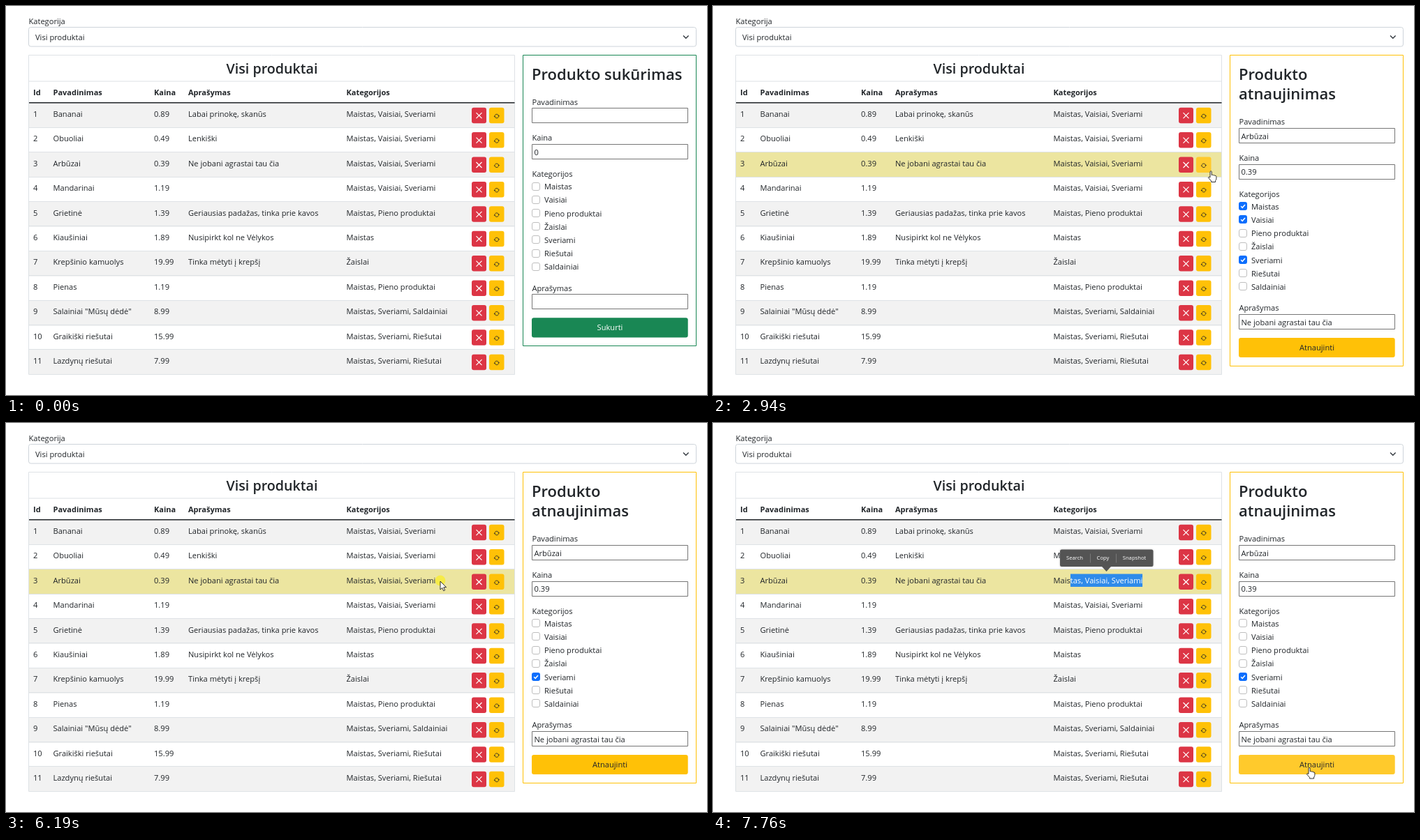
These frames come from a looping animation (1004x558 px, 8 s). An HTML page with a canvas:

```html
<!DOCTYPE html>
<html lang="lt">
<head>
<meta charset="utf-8">
<title>Produktai</title>
<style>
html, body { margin: 0; width: 100%; height: 100%; overflow: hidden; background: #fff; }
canvas { display: block; }
</style>
</head>
<body>
<canvas id="stage" width="1004" height="558"></canvas>
<script>
const ctx = document.getElementById('stage').getContext('2d');
const LOOP = 8000, INK = '#212529', LINE = '#dee2e6';
const GREEN = '#198754', YELLOW = '#ffc107', YELLOW_HOVER = '#ffca2c';
const FAMILY = '"Open Sans", "Noto Sans", sans-serif';
const BODY = `11.1px ${FAMILY}`, BOLD = `bold 11px ${FAMILY}`;
const ROW_TOP = 139.3, ROW_H = 35.4, PICKED = 2;
const SWITCH = 1860, FORM_SHIFT = 28.6;

const fruit = 'Maistas, Vaisiai, Sveriami';
const products = [
  ['Bananai', '0.89', 'Labai prinokę, skanūs', fruit],
  ['Obuoliai', '0.49', 'Lenkiški', fruit],
  ['Arbūzai', '0.39', 'Ne jobani agrastai tau čia', fruit],
  ['Mandarinai', '1.19', '', fruit],
  ['Grietinė', '1.39', 'Geriausias padažas, tinka prie kavos', 'Maistas, Pieno produktai'],
  ['Kiaušiniai', '1.89', 'Nusipirkt kol ne Vėlykos', 'Maistas'],
  ['Krepšinio kamuolys', '19.99', 'Tinka mėtyti į krepšį', 'Žaislai'],
  ['Pienas', '1.19', '', 'Maistas, Pieno produktai'],
  ['Salainiai "Mūsų dėdė"', '8.99', '', 'Maistas, Sveriami, Saldainiai'],
  ['Graikiški riešutai', '15.99', '', 'Maistas, Sveriami, Riešutai'],
  ['Lazdynų riešutai', '7.99', '', 'Maistas, Sveriami, Riešutai']
];
const columns = [39, 67.5, 212, 261, 487.5];
const categories = ['Maistas', 'Vaisiai', 'Pieno produktai', 'Žaislai', 'Sveriami', 'Riešutai', 'Saldainiai'];
// when each preselected category gets unchecked
const uncheckAt = { Maistas: 5760, Vaisiai: 4740, Sveriami: Infinity };
const clicks = [1790, 4710, 5730, 6160];

// pointer path: time, x, y
const path = [
  [70, 970, 546], [300, 905, 455], [520, 815, 365], [700, 749, 303], [780, 739, 284], [840, 752, 268],
  [1000, 742, 251], [1180, 729, 237], [1250, 727, 237], [1530, 713, 236.5], [2940, 713, 236.5],
  [3150, 730, 272], [3490, 757, 321], [4030, 757, 321], [4240, 757, 306], [4440, 757.5, 310], [4840, 757.5, 310],
  [5200, 643, 236], [5300, 650, 238], [5660, 757.5, 286], [5790, 757.5, 286], [6130, 622, 227], [6230, 622, 227],
  [6460, 546, 226], [6740, 511, 226], [7020, 511, 226], [7400, 690, 375], [7700, 854, 494], [8000, 854, 494]
];

function pointerAt(t) {
  const i = path.findIndex(p => p[0] > t);
  if (i < 1) return { x: path[0][1], y: path[0][2] };
  const a = path[i - 1], b = path[i], k = (t - a[0]) / (b[0] - a[0]);
  return { x: a[1] + (b[1] - a[1]) * k, y: a[2] + (b[2] - a[2]) * k };
}

function rect(x, y, w, h, color) {
  ctx.fillStyle = color;
  ctx.fillRect(x, y, w, h);
}

function frame(x, y, w, h, color, r = 0) {
  ctx.beginPath();
  ctx.roundRect(x, y, w, h, r);
  ctx.strokeStyle = color;
  ctx.lineWidth = 1;
  ctx.stroke();
}

function pill(x, y, w, h, r, color) {
  ctx.beginPath();
  ctx.roundRect(x, y, w, h, r);
  ctx.fillStyle = color;
  ctx.fill();
}

function strokeLine(points, color, width) {
  ctx.beginPath();
  points.forEach(([x, y]) => ctx.lineTo(x, y));
  ctx.strokeStyle = color;
  ctx.lineWidth = width;
  ctx.stroke();
}

// y is the middle of the capitals
function text(s, x, y, { font = BODY, color = INK, align = 'left', drop = 4 } = {}) {
  ctx.font = font;
  ctx.fillStyle = color;
  ctx.textAlign = align;
  ctx.fillText(s, x, y + drop);
}

function inside(p, x, y, w, h) {
  return p.x >= x && p.x <= x + w && p.y >= y && p.y <= y + h;
}

function drawSelect() {
  text('Kategorija', 32.5, 22);
  frame(32.5, 30.5, 956, 27.5, '#ced4da', 3);
  text('Visi produktai', 42, 44.5);
  strokeLine([[970, 42.5], [973.8, 46.3], [977.6, 42.5]], '#343a40', 1.4);
}

function drawRowButtons(y, hover) {
  const top = y + 6.4;
  pill(667, top, 21, 22.5, 3, '#dc3545');
  const cx = 677.5, cy = top + 11.5;
  strokeLine([[cx - 4, cy - 4], [cx + 4, cy + 4]], '#fff', 1.2);
  strokeLine([[cx + 4, cy - 4], [cx - 4, cy + 4]], '#fff', 1.2);
  pill(692, top, 21.5, 22.5, 3, hover ? YELLOW_HOVER : YELLOW);
  ctx.strokeStyle = ctx.fillStyle = INK;
  ctx.lineWidth = 0.8;
  for (const side of [0, Math.PI]) {
    ctx.save();
    ctx.translate(702.8, top + 12.3);
    ctx.rotate(side);
    ctx.beginPath();
    ctx.arc(0, 0, 2.8, Math.PI * 1.12, Math.PI * 1.9);
    ctx.stroke();
    ctx.beginPath();
    ctx.moveTo(1.5, -0.8);
    ctx.lineTo(4.2, -0.8);
    ctx.lineTo(2.9, 0.9);
    ctx.fill();
    ctx.restore();
  }
}

function drawTable(editing, hover) {
  products.forEach((product, i) => {
    const y = ROW_TOP + i * ROW_H, top = Math.round(y);
    const picked = editing && i === PICKED;
    if (picked || i % 2 === 0) rect(33, top, 695.5, 36, picked ? '#ece5a0' : '#f2f2f2');
    rect(33, Math.round(y + ROW_H) - 1, 695.5, 1, LINE);
    [String(i + 1), ...product].forEach((s, c) => text(s, columns[c], Math.round(y + 15.7)));
    drawRowButtons(y, hover && i === PICKED);
  });
  frame(32.5, 70.5, 696, 458, LINE);
  rect(33, 107.5, 695.5, 1, LINE);
  rect(33, 138, 695.5, 1.5, INK);
  text('Visi produktai', 381, 90, { font: `600 19.7px ${FAMILY}`, align: 'center', drop: 7 });
  ['Id', 'Pavadinimas', 'Kaina', 'Aprašymas', 'Kategorijos']
    .forEach((s, c) => text(s, columns[c], 124, { font: BOLD }));
}

function drawField(label, value, y) {
  text(label, 753.5, y);
  frame(753.5, Math.round(y + 8.6) + 0.5, 223, 21, '#767676');
  text(value, 756.5, y + 20.3);
}

function drawCheckbox(label, y, checked) {
  const top = Math.round(y - 6);
  if (checked) {
    pill(753, top, 12, 12, 3, '#0d6efd');
    strokeLine([[756.2, top + 6.2], [758.2, top + 8.3], [762, top + 4]], '#fff', 1.5);
  } else {
    frame(753.5, top + 0.5, 11, 11, '#bfbfbf', 2.5);
  }
  text(label, 771, y + 0.5);
}

function drawForm(t, editing, hover) {
  const dy = editing ? FORM_SHIFT : 0;
  const title = editing ? ['Produkto', 'atnaujinimas'] : ['Produkto sukūrimas'];
  const [name, price, note] = editing ? products[PICKED] : ['', '0', ''];
  frame(740.5, 70.5, 248, Math.round(417 + dy), editing ? YELLOW : GREEN);
  title.forEach((s, i) => text(s, 753, 98 + i * 28.3, { font: `600 22px ${FAMILY}`, drop: 8 }));
  drawField('Pavadinimas', name, 137.8 + dy);
  drawField('Kaina', price, 189.4 + dy);
  text('Kategorijos', 753.5, 241 + dy);
  categories.forEach((c, i) =>
    drawCheckbox(c, 258.6 + dy + i * 19.2, editing && t < (uncheckAt[c] || 0)));
  drawField('Aprašymas', note, 404.8 + dy);
  const fill = editing ? (hover ? YELLOW_HOVER : YELLOW) : (hover ? '#157347' : GREEN);
  pill(753, 447.3 + dy, 223.7, 28.2, 3, fill);
  text(editing ? 'Atnaujinti' : 'Sukurti', 865, 461.3 + dy,
    { color: editing ? INK : '#fff', align: 'center' });
}

function drawSelection(p, t) {
  if (t < 6230) return;
  const x0 = columns[4], y = ROW_TOP + PICKED * ROW_H;
  ctx.font = BODY;
  const edge = n => x0 + ctx.measureText(fruit.slice(0, n)).width;
  const head = t < 6740 ? p.x : 511;
  let n = 0;
  while (n < fruit.length && edge(n) < head - 2) n++;
  const left = edge(n), right = edge(fruit.length);
  if (right <= left) return;
  ctx.save();
  ctx.beginPath();
  ctx.rect(left, 216.5, right - left, 18.5);
  ctx.clip();
  rect(left, 216, right - left, 20, '#2f8bea');
  text(fruit, x0, Math.round(y + 15.7), { color: '#fff' });
  ctx.restore();
}

function drawPopup() {
  ctx.save();
  ctx.shadowColor = 'rgba(0,0,0,.25)';
  ctx.shadowBlur = 3;
  pill(497, 181.5, 133.5, 24.5, 2.5, '#545454');
  ctx.restore();
  ctx.beginPath();
  ctx.moveTo(557, 206);
  ctx.lineTo(570, 206);
  ctx.lineTo(563.5, 213);
  ctx.fillStyle = '#545454';
  ctx.fill();
  [540, 577].forEach(x => rect(x, 187.5, 1, 13, '#777'));
  [['Search', 518], ['Copy', 558.5], ['Snapshot', 603.5]].forEach(([s, x]) =>
    text(s, x, 193.5, { font: `7.7px ${FAMILY}`, color: '#fff', align: 'center', drop: 2.8 }));
}

function drawRipple(t) {
  for (const start of clicks) {
    const k = (t - start) / 230;
    if (k < 0 || k >= 1) continue;
    const p = pointerAt(start);
    ctx.beginPath();
    ctx.arc(p.x, p.y - 1, 7 + 3 * k, 0, 7);
    ctx.fillStyle = `rgba(250,238,30,${0.75 * (1 - k * 0.7)})`;
    ctx.fill();
  }
}

const shapes = {
  arrow: new Path2D('M0 0V12L2.8 9.4L4.7 13.7L6.7 12.8L4.8 8.7H8.6Z'),
  hand: new Path2D('M-1 1Q0-.6 1.2 1V6Q2.4 5 3.4 6.3Q4.8 5.5 5.8 6.9Q7.3 6.3 7.9 8V11.5Q7.6 13 6.6 14V16H.6V14.5L-3.6 9.8Q-3.6 7.9-1 9.3Z'),
  beam: new Path2D('M-2-6H2M0-6V6M-2 6H2')
};

function drawPointer(p, kind) {
  ctx.save();
  ctx.translate(p.x, p.y);
  ctx.strokeStyle = '#1c1c1c';
  ctx.lineWidth = 0.9;
  ctx.lineJoin = 'round';
  ctx.fillStyle = '#fff';
  if (kind !== 'beam') ctx.fill(shapes[kind]);
  ctx.stroke(shapes[kind]);
  ctx.restore();
}

function draw(t) {
  const p = pointerAt(t), editing = t >= SWITCH;
  const shown = t >= 70 && (t < 7020 || t >= 7090);
  const overRow = shown && inside(p, 692, 216, 22, 23);
  const overSubmit = shown && inside(p, 753, 447 + (editing ? FORM_SHIFT : 0), 224, 28);
  rect(0, 0, 1004, 558, '#fff');
  drawSelect();
  drawTable(editing, overRow);
  drawForm(t, editing, overSubmit);
  drawSelection(p, t);
  if (t >= 7150) drawPopup();
  drawRipple(t);
  if (shown) {
    const dragging = t >= 6260 && t < 7020;
    drawPointer(p, dragging ? 'beam' : overRow || overSubmit ? 'hand' : 'arrow');
  }
}

let begin;
function tick(now) {
  begin ??= now;
  draw((now - begin) % LOOP);
  requestAnimationFrame(tick);
}
draw(0);
requestAnimationFrame(tick);
</script>
</body>
</html>
```
